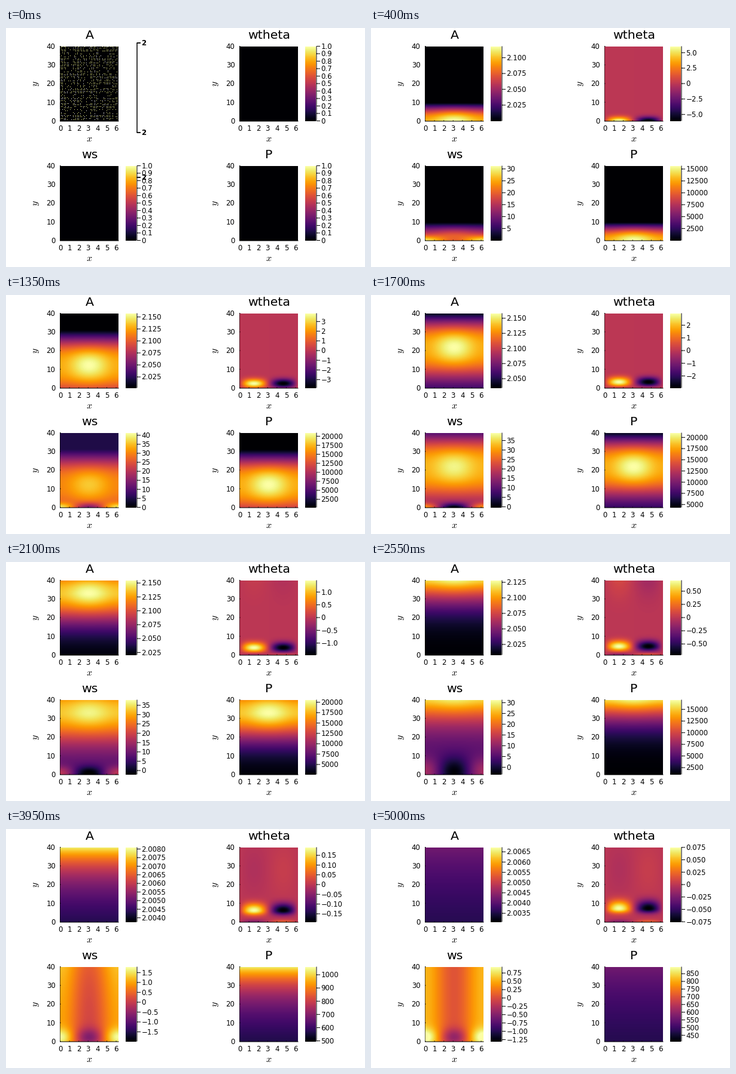
These frames come from a looping animation (600 px wide and 400 px high, 5050 ms). A matplotlib script:

```python
import numpy as np
import matplotlib as mpl
import matplotlib.pyplot as plt
from matplotlib.animation import FuncAnimation

mpl.rcParams["font.family"] = "DejaVu Sans"
mpl.rcParams["mathtext.fontset"] = "cm"

PX = 0.72                       # points per pixel at 100 dpi
FRAMES, STEP = 101, 50
W, H = 98, 125                  # heatmap size in pixels
LEFT, TOP, BOTTOM = 90, 31, 156
SMALL, BIG = 11.7 * PX, 20.5 * PX

X, Y = np.meshgrid((np.arange(W) + 0.5) / W * 2 * np.pi,
                   (H - 0.5 - np.arange(H)) / H * 40)
CX, SX = np.cos(X), np.sin(X)

cmap = mpl.colormaps["inferno"].copy()
cmap.set_bad("white")


def ramp(t, a, b):
    return min(max((t - a) / (b - a), 0), 1)


def sigmoid(t, mid, width):
    return 1 / (1 + np.exp((mid - t) / width))


def bell(v, mid, width):
    return np.exp(-((v - mid) / width) ** 2)


def pulse(t, narrow=1.0):
    """Wave that leaves the bottom edge and runs out at the top."""
    d = Y - np.clip(1.375 * (t - 18), 0, 41)
    reach = min(2 + t, 19)
    ahead = np.cos(np.pi / 2 * np.clip(d / reach, 0, 1)) ** 1.2
    tail = narrow * max(17.4 - 0.27 * max(t - 34, 0), 9.5 + 0.55 * (t - 63))
    late = ramp(t, 34, 63)
    behind = np.exp(-(np.maximum(-d, 0) / tail) ** (2 - late))
    bump = 0.09 * (1 - late)
    return np.where(d > 0, ahead, behind) * (1 - bump * (1 + CX) * bell(d, 0, 10))


def layer(t, narrow=1.0):
    base = 0.08 * ramp(t, 63, 100)
    amp = (1 - base) * np.exp(-0.07 * max(t - 81, 0))
    return base + amp * pulse(t, narrow)


def upper(t, peak, floor, slope):
    """Scale maximum: quick rise, drop as the wave leaves, slow decline."""
    drop = 1 - sigmoid(t, 56.5, 4)
    return (1 - np.exp(-t / 6)) * (peak * drop
                                   + floor * (1 + slope * (100 - t)))


def lower(t, peak, floor, slope):
    """Scale minimum: zero until the wave has crossed the panel."""
    return sigmoid(t, 33.8, 1.5) * (peak * np.exp((34 - t) / 6)
                                    + floor * (1 + slope * (100 - t)))


def field_a(t):
    return (layer(t), 2 + lower(t, 0.06, 0.00308, 0.01),
            2 + upper(t, 0.15, 0.00672, 0.006))


def field_p(t):
    return (layer(t, 0.95), lower(t, 7500, 410, 0.0095),
            upper(t, 20000, 895, 0.005))


def field_theta(t):
    top = (0.39 * np.exp((63 - t) / 22.5)
           + 2 * (1 - sigmoid(t, 38, 3.4))) * (1 - np.exp(-t / 3))
    mid = 0.1 + 0.8 * np.sqrt(max(t - 18, 0))
    size = np.where(Y > mid, 2.3 + 0.025 * max(t - 18, 0), 2.5)
    lobes = (bell(Y, mid, size)
             - 0.3 * ramp(t, 18, 51) * bell(Y, 0, 1.4)
             + 0.14 * bell(t, 50, 8) * bell(Y, 43, 12)
             - 0.06 * ramp(t, 54, 63) * bell(Y, 28, 14))
    return 0.5 + 0.5 * SX * lobes, -top, top


def field_ws(t):
    hi = upper(t, 36, 0.938, 0.037) + 8.5 * bell(t, 18, 8)
    lo = -1.304 * np.exp((100 - t) / 50) * sigmoid(t, 42, 3)
    fade = ramp(t, 57, 82)
    base = 0.22 * ramp(t, 18, 34) + 0.5 * fade
    lane = 0.11 * ramp(t, 51, 75)
    wall = 0.21 + 0.16 * bell(t, 33, 8)
    size = 2.5 + 2.2 * ramp(t, 34, 51) + 3 * bell(t, 51, 6)
    skew = 0.5 * (1 - ramp(t, 18, 34))
    edge = wall * (CX + skew) * bell(Y, 2.5 * ramp(t, 34, 63), size)
    return base + lane * CX + 0.75 * (1 - fade) * pulse(t) + edge, lo, hi


def speckle():
    """Rounding noise on a 40 by 50 grid, denser in some bands."""
    rng = np.random.default_rng(4)
    z = np.zeros((H, W))
    for j in range(50):
        band = 0.45 + 0.25 * np.sin(j * 0.9) * np.sin(j * 0.23 + 1)
        for i in range(40):
            if rng.random() < band + 0.15 * np.sin(i * 0.6):
                white = rng.random() < 0.25
                z[int(j * 2.5), int(i * 2.45)] = np.nan if white else 0.97
    return z


def ticks(lo, hi):
    """Smallest 1 / 2.5 / 5 step that gives at most nine ticks."""
    mag = 10.0 ** np.floor(np.log10((hi - lo) / 20))
    for step in (m * mag * s for s in (1, 10, 100) for m in (1, 2.5, 5)):
        first = np.ceil(lo / step + 1e-3)
        last = np.floor(hi / step)
        if last - first < 9:
            break
    return np.arange(first, last + 1) * step, step


def labels(values, step):
    places = 0
    while places < 8 and abs(round(step, places) - step) > step * 1e-6:
        places += 1
    return ["0" if abs(v) < step / 1e3 else
            f"{v:.{places}f}".replace("-", "\u2212") for v in values]


fig = plt.figure(figsize=(6, 4), dpi=100, facecolor="white")
ax = fig.add_axes([0, 0, 1, 1])


def text(x, y, s, ha="center", size=SMALL, **kw):
    return ax.text(x, y, s, ha=ha, va=kw.pop("va", "baseline"),
                   fontsize=size, **kw)


def stroke(x, y, width=1):
    return ax.plot(x, y, color="black", lw=width * PX, zorder=3, snap=False,
                   solid_capstyle="butt")[0]


class Panel:
    def __init__(self, dx, dy, title, field):
        self.dx, self.dy, self.field = dx, dy, field
        top, bottom = TOP + dy, BOTTOM + dy
        left = LEFT + dx
        opts = dict(cmap=cmap, vmin=0, vmax=1, aspect="auto",
                    interpolation="nearest")
        self.map = ax.imshow(np.zeros((H, W)),
                             extent=(left, left + W, bottom, top), **opts)
        self.bar = ax.imshow(np.linspace(1, 0, H)[:, None],
                             extent=(200 + dx, 218 + dx, bottom, top), **opts)
        stroke([left + 0.4] * 2, [top - 0.5, bottom], 0.6)
        stroke([left, left + W + 0.5], [bottom] * 2)
        for n in range(7):
            x = left + 0.5 + n * W / (2 * np.pi)
            stroke([x, x], [bottom - 1.5, bottom])
            text(x, bottom + 15.8, str(n))
        for n in range(5):
            y = bottom - 0.5 - n * 31.25
            stroke([left, left + 1.5], [y, y])
            text(left - 7.5, y + 4.3, str(n * 10), "right")
        text(139.5 + dx, 18.5 + dy, title, size=BIG)
        text(139 + dx, 185 + dy, "$x$", size=16 * PX, va="center")
        text(50 + dx, 93 + dy, "$y$", size=16 * PX, va="center", rotation=90)
        self.axis = stroke([], [])
        self.names = [text(226.5 + dx, 0, "", "left", zorder=4)
                      for _ in range(11)]

    def scale(self, lo, hi, values, step):
        x = 219 + self.dx
        low = BOTTOM - 0.5 + self.dy
        ys = low - (values - lo) / (hi - lo) * H
        px, py = [x, x], [low, low - H]
        for y in ys:
            px += [np.nan, x, x + 6]
            py += [np.nan, y, y]
        self.axis.set_data(px, py)
        for name in self.names:
            name.set_text("")
        for name, y, s in zip(self.names, ys, labels(values, step)):
            name.set_y(y + 4.3)
            name.set_text(s)

    def show(self, t):
        if t == 0:
            self.map.set_data(np.zeros((H, W)))
            self.scale(0, 1, np.arange(11) / 10, 0.1)
            return
        z, lo, hi = self.field(t)
        self.map.set_data(np.clip(z, 0, 1))
        self.scale(lo, hi, *ticks(lo, hi))


panels = [Panel(0, 0, "A", field_a), Panel(300, 0, "wtheta", field_theta),
          Panel(0, 200, "ws", field_ws), Panel(300, 200, "P", field_p)]

# Degenerate colour scale of the uniform first state
flat = [stroke([219, 219], [25, 175], 1.5)]
for y in (25, 175, 250):
    flat.append(stroke([218.5, 225], [y, y], 1.8))
    flat.append(text(226.5, y + 4.3, "2", "left", weight="bold", zorder=4))

ax.set_xlim(0, 600)
ax.set_ylim(400, 0)
ax.axis("off")
dots = np.ma.masked_invalid(speckle())


def update(t):
    for panel in panels:
        panel.show(t)
    start = t == 0
    first = panels[0]
    if start:
        first.map.set_data(dots)
    for part in flat:
        part.set_visible(start)
    for part in [first.bar, first.axis] + first.names:
        part.set_visible(not start)
    return []


anim = FuncAnimation(fig, update, frames=FRAMES, interval=STEP,
                     init_func=lambda: update(0), repeat=True,
                     repeat_delay=0, blit=False)
plt.show()
```
